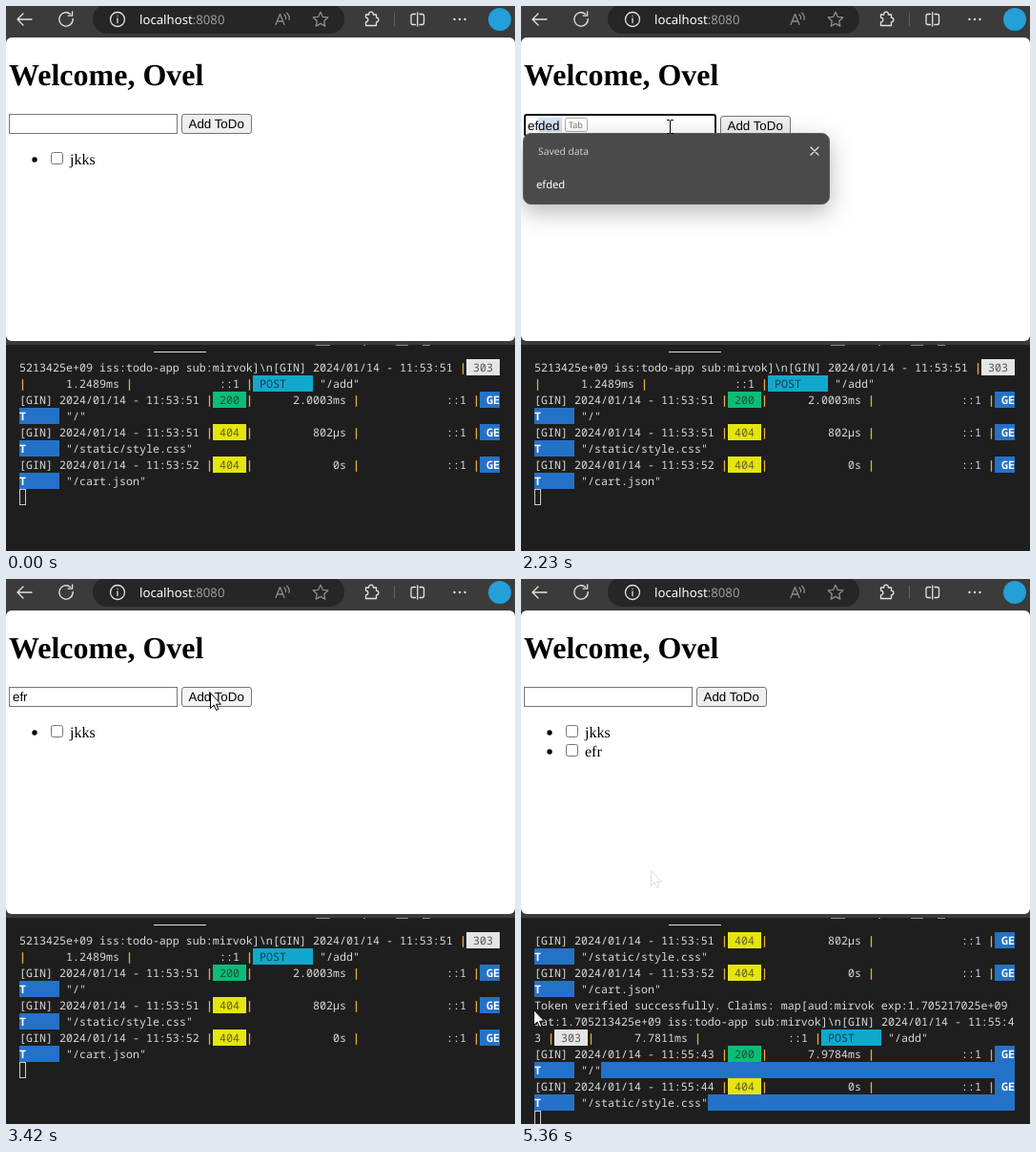
An HTML page for the animation above (5.59 s loop, 534x571 px).

```html
<!DOCTYPE html>
<html lang="en">
<head>
<meta charset="utf-8">
<title>ToDo demo</title>
<style>
html, body { margin: 0; width: 100%; height: 100%; overflow: hidden; background: #1e1e1e; }
svg { display: block; }
text { white-space: pre; text-rendering: geometricPrecision; }
.ui { font-family: "Noto Sans", "Open Sans", sans-serif; }
.form { font: 13.333px "Liberation Sans", Arial, sans-serif; }
.serif { font: 16px "Liberation Serif", "Times New Roman", serif; }
.mono { font: 500 11.667px "Noto Sans Mono", "DejaVu Sans Mono", monospace; }
.strong { font-weight: 700; }
.line { fill: none; stroke: #e4e4e4; stroke-width: 1.3; stroke-linecap: round; stroke-linejoin: round; }
.dim { stroke: #8d8d8d; }
#popup { filter: drop-shadow(0 8px 12px rgba(0, 0, 0, .28)); transform-origin: 165px 171px; }
</style>
</head>
<body>
<svg width="534" height="571" viewBox="0 0 534 571">
  <rect width="534" height="357" fill="#3b3b3b"/>
  <rect y="355" width="534" height="216" fill="#1e1e1e"/>
  <path d="M155 362.5H210" stroke="#e0e0e0"/>
  <path d="M325 355.5H340M375 355.5H377M409 355.5H422M437 355.5H445" stroke="#8a8a8a"/>

  <rect x="91" y="-2" width="264" height="31" rx="15.5" fill="#262626"/>
  <path class="line" d="M12 14H27M18 8L12 14L18 20"/>
  <path class="line" id="reload" d="M70.2 13.5A7.2 7.2 0 1 1 67.6 8.4M69.6 6V10.2H65.2"/>
  <path class="line" id="stop" d="M57.5 8.5L68.5 19.5M68.5 8.5L57.5 19.5"/>
  <circle class="line" cx="117" cy="14" r="7.5"/>
  <path class="line" d="M117 13V17.6M117 10.3V10.4"/>
  <text class="ui" x="140" y="19" font-size="13.2" fill="#fff">localhost<tspan fill="#9c9c9c">:8080</tspan></text>
  <path class="line dim" d="M283 19.5L287.5 8.5L292 19.5M284.7 16H290.3M292 9Q294 11 293.5 13.5M294.6 7.3Q298 10.5 297 14.3"/>
  <path class="line dim" id="star"/>
  <path class="line" d="M377.5 9H380.8A2.3 2.3 0 1 1 385.2 9H388.5V12.2A2.3 2.3 0 1 1 388.5 16.8V20.5H377.5V16.8A2.3 2.3 0 0 0 377.5 12.2Z"/>
  <path d="M407.5 7V21" stroke="#606060"/>
  <path class="line" d="M429.5 8.5H427Q425 8.5 425 10.5V17.5Q425 19.5 427 19.5H429.5M434 8.5H436.5Q438.5 8.5 438.5 10.5V17.5Q438.5 19.5 436.5 19.5H434M431.7 7V21"/>
  <g fill="#ececec"><circle cx="470.5" cy="14" r="1.15"/><circle cx="476" cy="14" r="1.15"/><circle cx="481.5" cy="14" r="1.15"/></g>
  <circle cx="518" cy="14" r="12" fill="#249fd8"/>

  <rect y="33" width="534" height="318" rx="6" fill="#fff"/>
  <text class="serif" x="3" y="83" style="font-size:32px;font-weight:bold">Welcome, Ovel</text>
  <g id="items"></g>
  <rect id="field" fill="#fff"/>
  <g id="entry">
    <rect id="mark" x="18" y="115" width="25" height="15" fill="#d3e2f6"/>
    <text class="form" id="typed" x="7" y="128"></text>
    <path id="caret" stroke="#000"/>
  </g>
  <g id="chip">
    <rect x="46.5" y="117.5" width="23" height="14" rx="2" fill="#fff" stroke="#adadad"/>
    <text class="ui" x="50" y="128" font-size="9" fill="#777">Tab</text>
  </g>
  <g id="button">
    <rect id="face" x="184.5" y="113.5" width="73" height="20" rx="2.5"/>
    <text class="form" x="191.5" y="128">Add ToDo</text>
  </g>

  <g id="log"></g>
  <rect id="block" x="14.5" width="6" height="16" fill="none" stroke="#ccc"/>

  <g id="popup" class="ui">
    <rect id="sheet" x="2.5" y="133.5" width="321" rx="8" fill="#4a4a4a" stroke="#585858"/>
    <text x="18" y="156" font-size="10.3" fill="#cdcdcd">Saved data</text>
    <path class="line" d="M304 148L312 156M312 148L304 156"/>
    <g id="options" font-size="11.2" fill="#fff"></g>
    <g id="scroll">
      <path d="M306 165H323V344Q323 351 316 351H306Z" fill="#2c2c2c"/>
      <rect x="309" y="184" width="11" height="129" rx="5" fill="#777"/>
      <path class="line" d="M311 175L314.5 171.5L318 175M311 341L314.5 344.5L318 341"/>
    </g>
  </g>

  <path id="ghost" transform="translate(136 305)" fill="#fff" stroke="#dcdcdc"/>
  <path id="arrow" fill="#fff" stroke="#000"/>
  <path id="beam" d="M153 119.5H156M157 119.5H160M156.5 120V133M153 133.5H156M157 133.5H160" stroke="#000"/>
</svg>
<script>
const LOOP = 5590, COLS = 72, CELL = 7, ROW = 17, LEFT = 14, TOP = 370;
const $ = id => document.getElementById(id);
const show = (el, on) => { el.style.display = on ? '' : 'none'; };

function set(el, attrs) {
  for (const k in attrs) el.setAttribute(k, attrs[k]);
}

function add(parent, tag, attrs, text = '') {
  const el = document.createElementNS('http://www.w3.org/2000/svg', tag);
  set(el, attrs);
  el.textContent = text;
  return parent.appendChild(el);
}

// Terminal: styled text wrapped into fixed-width rows
const STYLES = {
  303: { ink: '#555', paper: '#e5e5e5' },
  200: { ink: '#234b3a', paper: '#0dbc79' },
  404: { ink: '#625f20', paper: '#e5e510' },
  POST: { ink: '#123f4c', paper: '#11a8cd' },
  GET: { ink: '#fff', paper: '#2472c8', weight: 'strong' },
  bar: { ink: '#e5ad45', weight: 'strong' },
  plain: { ink: '#dadada' }
};
const rows = [];
let col = 0;

function newLine() {
  rows.push(add($('log'), 'g', { class: 'mono' }));
  col = 0;
}

function put(str, style = 'plain') {
  const { ink, paper, weight = '' } = STYLES[style];
  while (str) {
    if (col === COLS) newLine();
    const part = str.slice(0, COLS - col), g = rows.at(-1);
    const x = LEFT + col * CELL;
    if (paper) add(g, 'rect', { x, width: part.length * CELL, height: ROW, fill: paper });
    if (part.trim()) {
      const indent = part.length - part.trimStart().length;
      add(g, 'text', { x: x + indent * CELL, y: 13, fill: ink, class: weight }, part.trim());
    }
    col += part.length;
    str = str.slice(part.length);
  }
}

function request(time, code, took, method, path, smear) {
  put(`[GIN] 2024/01/14 - ${time} `);
  put('|', 'bar');
  put(` ${code} `, code);
  put('|', 'bar');
  put(` ${took.padStart(13)} `);
  put('|', 'bar');
  put(` ${'::1'.padStart(15)} `);
  put('|', 'bar');
  put(` ${method.padEnd(7)} `, method);
  put(` "${path}"`);
  if (smear) put(' '.repeat(COLS - col), method);
  newLine();
}

newLine();
put('5213425e+09 iss:todo-app sub:mirvok]\\n');
request('11:53:51', 303, '1.2489ms', 'POST', '/add');
request('11:53:51', 200, '2.0003ms', 'GET', '/');
request('11:53:51', 404, '802µs', 'GET', '/static/style.css');
request('11:53:52', 404, '0s', 'GET', '/cart.json');
put('Token verified successfully. Claims: map[aud:mirvok exp:1.705217025e+09 ');
put('iat:1.705213425e+09 iss:todo-app sub:mirvok]\\n');
request('11:55:43', 303, '7.7811ms', 'POST', '/add');
request('11:55:43', 200, '7.9784ms', 'GET', '/', true);
request('11:55:44', 404, '0s', 'GET', '/static/style.css', true);

// Page parts
const items = ['jkks', 'efr'].map((name, i) => {
  const g = add($('items'), 'g', { transform: `translate(0 ${i * 20})` });
  add(g, 'circle', { cx: 30, cy: 161, r: 2.7 });
  add(g, 'rect', { x: 47.5, y: 153.5, width: 12, height: 12, rx: 2, fill: '#fff', stroke: '#767676' });
  add(g, 'text', { x: 67, y: 166, class: 'serif' }, name);
  return g;
});
const options = Array.from({ length: 5 }, (_, i) => add($('options'), 'text', { x: 16, y: 191 + i * 34 }));

const starPoints = Array.from({ length: 10 }, (_, i) => {
  const a = i * Math.PI / 5 - Math.PI / 2, r = i % 2 ? 3.9 : 8.2;
  return `${330 + r * Math.cos(a)} ${14.5 + r * Math.sin(a)}`;
});
set($('star'), { d: `M${starPoints.join('L')}Z` });
for (const id of ['arrow', 'ghost'])
  set($(id), { d: 'M.5 .5V16.5L4.2 13L6.6 18.5L8.8 17.5L6.5 12.2H11.5Z' });

// Timelines: [start, value]
const TYPED = [[0, ''], [2040, 'e'], [2190, 'ef'], [2230, 'efded'], [2330, 'efr'], [4620, '']];
const LISTS = [
  [0, ['djkfe', 'wejdic', 'jhh', 'errw', 'jgh']],
  [2040, ['errw', 'efded']],
  [2230, ['efded']]
];
const LINES = [[0, 8], [3540, 11], [3690, 13], [4150, 15]];
// Pointer path: [time, x, y]
const PATH = [
  [520, 512, 134], [569, 512, 134], [570, 477, 134], [750, 477, 134], [900, 350, 118],
  [1060, 200, 150], [1140, 172, 146], [1270, 156, 134], [2450, 155, 128], [2510, 154, 126],
  [2540, 155, 122], [2850, 155, 122], [3180, 214, 119], [4030, 214, 119], [4280, 136, 305],
  [4530, 136, 305], [4860, 60, 432], [5060, 36, 451], [5170, 30, 443], [5360, 13, 451]
];

const valueAt = (table, t) => table.findLast(step => step[0] <= t)[1];
const ramp = (t, a, b) => Math.min(1, Math.max(0, (t - a) / (b - a)));
const within = (t, a, b) => t >= a && t < b;

function pointerAt(t) {
  const i = PATH.findLastIndex(p => p[0] <= t);
  if (i < 0) return null;
  const a = PATH[i], b = PATH[i + 1] || a;
  const k = a === b ? 0 : ramp(t, a[0], b[0]);
  return [1, 2].map(n => Math.round(a[n] + (b[n] - a[n]) * k));
}

function drawForm(t) {
  const focus = within(t, 1480, 3360), hint = within(t, 2230, 2330);
  const edge = focus ? 2 : 1, text = valueAt(TYPED, t);
  // The hint chip makes the field wider and taller
  set($('field'), {
    x: 3 + edge / 2,
    y: 113 + edge / 2,
    width: (hint ? 202 : 177) - edge,
    height: (hint ? 24 : 21) - edge,
    rx: focus ? 2 : 0,
    stroke: focus ? '#101010' : '#767676',
    'stroke-width': edge
  });
  set($('entry'), { transform: `translate(0 ${hint ? 2 : 0})` });
  $('typed').textContent = text;
  show($('mark'), hint);
  show($('chip'), hint);
  const caretX = { '': 7.5, e: 14.5, ef: 18.5 }[text] || 22.5;
  set($('caret'), { d: `M${caretX} 116V131` });
  show($('caret'), focus && !hint && t >= 1540 && !within(t, 2850, 3350));

  const hover = within(t, 3120, 4070), press = within(t, 3360, 3450);
  set($('button'), { transform: hint ? 'translate(25 2)' : '' });
  set($('face'), {
    fill: press ? '#f5f5f5' : hover ? '#e5e5e5' : '#efefef',
    stroke: hover && !press ? '#4f4f4f' : '#767676'
  });
}

function drawPopup(t) {
  const open = ramp(t, 1760, 1900), close = ramp(t, 2360, 2520);
  const popup = $('popup'), list = valueAt(LISTS, t);
  const full = list.length === options.length;
  show(popup, within(t, 1790, 2540));
  popup.style.opacity = Math.min(open, Math.max(.08, 1 - close));
  popup.style.transform = `scale(${1 - .05 * close})`;
  set($('sheet'), { height: full ? 217 : 40 + 34 * list.length });
  show($('scroll'), full);
  options.forEach((el, i) => { el.textContent = list[i] || ''; });
}

function drawLog(t) {
  const end = valueAt(LINES, t), first = Math.max(0, end - 11);
  rows.forEach((g, i) => {
    show(g, i >= first && i < end);
    set(g, { transform: `translate(0 ${TOP + (i - first) * ROW})` });
  });
  set($('block'), { y: TOP + (end - first) * ROW + .5 });
}

function drawPointer(t) {
  const pos = pointerAt(t), beam = within(t, 1320, 2450);
  show($('beam'), beam);
  show($('arrow'), pos && !beam);
  if (pos) set($('arrow'), { transform: `translate(${pos})` });
  show($('ghost'), t >= 4560);
}

function draw(t) {
  const loading = within(t, 3450, 4800);
  show($('reload'), !loading);
  show($('stop'), loading);
  show(items[1], t >= 4620);
  drawForm(t);
  drawPopup(t);
  drawLog(t);
  drawPointer(t);
}

const start = performance.now();
function tick() {
  draw((performance.now() - start) % LOOP);
  requestAnimationFrame(tick);
}
tick();
</script>
</body>
</html>
```
